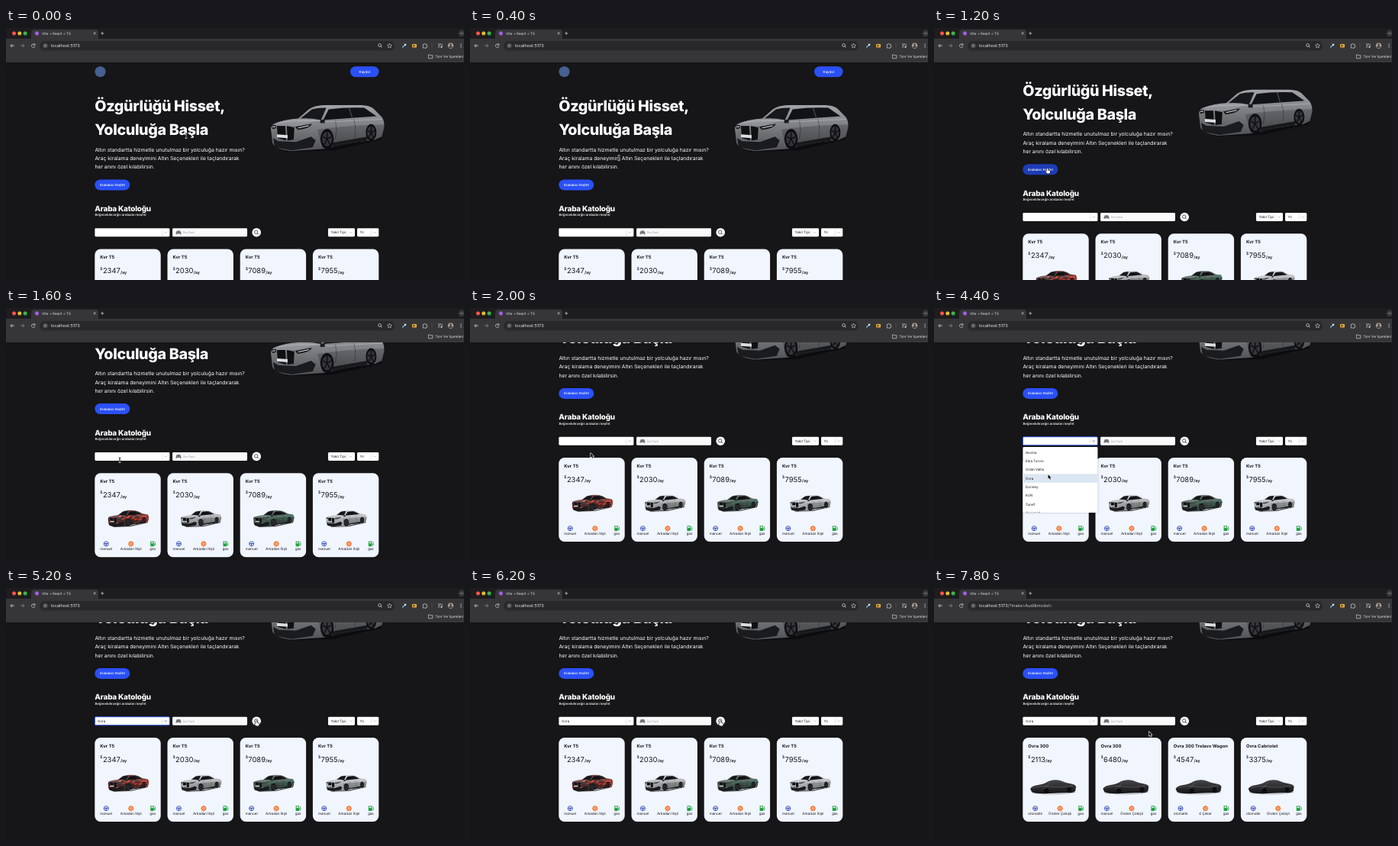
Write an HTML page with a canvas that moves like this. It is 600 px wide and 330 px high and loops after 8000 ms.

```html
<!DOCTYPE html>
<html lang="tr">
<head>
<meta charset="utf-8">
<title>Araba Kataloğu</title>
<style>
html, body { margin: 0; width: 100%; height: 100%; overflow: hidden; background: #161518; }
canvas { display: block; width: 600px; height: 330px; }
</style>
</head>
<body>
<canvas id="stage"></canvas>
<script>
const LOOP = 8000, STEP = 200;
const OPEN = 2600, PICK = 4600, BLUR = 6000, SEARCH = 6400, LOADED = 7000;
const BLUE = '#2a50f6', INK = '#17171c', BAR = '#363638', ICON = '#d5d5d8';

const canvas = document.getElementById('stage');
const c = canvas.getContext('2d');
const ratio = Math.max(1, window.devicePixelRatio || 1);
canvas.width = 600 * ratio;
canvas.height = 330 * ratio;
c.textRendering = 'geometricPrecision';

const MAKES = ['Avoma', 'Elna Torvio', 'Ordel Valtis', 'Ovra', 'Dorvley', 'KVR', 'Tunef', 'Gavirond'];
const START_CARDS = [
  { name: 'Kvr T5', price: 2347, paint: ['#6e4442', '#2c2021'], camo: '#d8483b' },
  { name: 'Kvr T5', price: 2030, paint: ['#cfd0d2', '#808286'] },
  { name: 'Kvr T5', price: 7089, paint: ['#6d7d78', '#2d3b38'], camo: '#46705f' },
  { name: 'Kvr T5', price: 7955, paint: ['#d5d7da', '#8e9196'] }
].map(card => ({ gear: 'manuel', drive: 'Arkadan İtişli', ...card }));
const FOUND_CARDS = [
  { name: 'Ovra 300', price: 2113, gear: 'otomatik', drive: 'Önden Çekişli' },
  { name: 'Ovra 300', price: 6480, gear: 'manuel', drive: 'Önden Çekişli' },
  { name: 'Ovra 300 Trelavo Wagon', price: 4547, gear: 'otomatik', drive: '4 Çeker' },
  { name: 'Ovra Cabriolet', price: 3375, gear: 'otomatik', drive: 'Önden Çekişli' }
];

// time, x, y, pointer shape
const MOUSE = [
  [0, 236, 141, 'beam'], [200, 232, 144, 'beam'], [400, 195, 170, 'beam'],
  [800, 149, 203, 'hand'], [1200, 148.5, 184, 'hand'], [1400, 149, 194, 'arrow'],
  [1600, 149, 199, 'beam'], [2000, 158, 190, 'arrow'], [2400, 200, 172, 'arrow'],
  [2800, 200.5, 171, 'arrow'], [3200, 190, 177, 'arrow'], [3800, 158, 202, 'arrow'],
  [4200, 149.5, 218, 'arrow'], [4600, 149.5, 218, 'arrow'], [4800, 316, 171, 'arrow'],
  [5200, 328, 174, 'hand'], [7000, 328, 174, 'hand'], [7200, 312, 180, 'arrow'],
  [7600, 281.5, 188, 'arrow'], [8000, 281.5, 188, 'arrow']
];

const clamp = v => Math.min(1, Math.max(0, v));
const ease = v => (1 - Math.cos(Math.PI * clamp(v))) / 2;
const scrollAt = t => 93.5 * ease((t - 880) / 1040);

function mouseAt(t) {
  const i = MOUSE.findIndex(k => k[0] > t);
  const [t0, x0, y0, kind] = MOUSE[i - 1], [t1, x1, y1] = MOUSE[i];
  const p = ease((t - t0) / (t1 - t0));
  return { x: x0 + (x1 - x0) * p, y: y0 + (y1 - y0) * p, kind };
}

function font(size, weight = 400) {
  c.font = `${weight} ${size}px Inter, "Open Sans", sans-serif`;
}

// y is the middle of the capital letters
function text(s, x, y, size, color = '#fff', weight = 400, align = 'left') {
  font(size, weight);
  c.textAlign = align;
  c.fillStyle = color;
  c.fillText(s, x, y + size * 0.36);
}

function heading(s, x, y, size) {
  c.letterSpacing = `${-size * 0.018}px`;
  text(s, x, y, size, '#fff', 800);
  c.letterSpacing = '0px';
}

function box(x, y, w, h, r, fill) {
  c.beginPath();
  c.roundRect(x, y, w, h, r);
  c.fillStyle = fill;
  c.fill();
}

function dot(x, y, r, fill) {
  c.beginPath();
  c.arc(x, y, r, 0, 7);
  c.fillStyle = fill;
  c.fill();
}

function ring(x, y, r, color, width = 0.8) {
  c.beginPath();
  c.arc(x, y, r, 0, 7);
  c.strokeStyle = color;
  c.lineWidth = width;
  c.stroke();
}

function fill(d, color) {
  c.fillStyle = color;
  c.fill(new Path2D(d));
}

function line(d, color, width = 0.8) {
  c.strokeStyle = color;
  c.lineWidth = width;
  c.stroke(new Path2D(d));
}

function at(x, y, scale, draw) {
  c.save();
  c.translate(x, y);
  c.scale(scale, scale);
  draw();
  c.restore();
}

function shade(y0, y1, top, bottom) {
  const g = c.createLinearGradient(0, y0, 0, y1);
  g.addColorStop(0, top);
  g.addColorStop(1, bottom);
  return g;
}

function wheel(x, y, rx, ry) {
  const disc = (k, color) => {
    c.beginPath();
    c.ellipse(x, y, rx * k, ry * k, 0, 0, 7);
    c.fillStyle = color;
    c.fill();
  };
  disc(1, '#0d0d0f');
  disc(0.74, '#34353a');
  for (let i = 0; i < 5; i++) {
    const a = i * 1.257 - 1.57;
    line(`M${x} ${y}l${Math.cos(a) * rx * 0.7} ${Math.sin(a) * ry * 0.7}`, '#101012', 1.5);
  }
}

const NOSE = 'M1 32Q1 26 7 24Q20 19 37 18';
const TAIL = 'Q151 22 150 30L147 42L138 46L92 52L72 58L26 61Q6 58 3 50Z';
const WAGON = { body: `${NOSE}L51 6Q58 1 72 .5L120 .5Q131 1 136 5L147 16${TAIL}`, glass: 'M70 20L77 6Q100 3 124 4L140 15Z' };
const SEDAN = { body: `${NOSE}L56 5Q66 1 80 .5L100 1.5Q114 4 127 13L146 16${TAIL}`, glass: 'M71 20L80 6Q93 4 105 5L123 15Z' };

// drawn in a 152 by 61 space, nose to the left
function car(shape, [top, bottom], camo) {
  fill('M6 54L80 57L147 42L146 46L84 60L22 62Z', 'rgba(8,8,10,.7)');
  fill(shape.body, shade(0, 62, top, bottom));
  c.save();
  c.clip(new Path2D(shape.body));
  if (camo) {
    let seed = 7;
    const rand = () => (seed = seed * 16807 % 2147483647) / 2147483647;
    for (let i = 0; i < 36; i++) {
      const x = rand() * 150, y = 15 + rand() * 34;
      fill(`M${x} ${y}l${5 + rand() * 9} -4l5 ${rand() * 8}l-11 4z`, camo);
    }
  }
  fill('M5 25Q20 19 37 18L70 20Q52 22 40 28L8 28Z', 'rgba(255,255,255,.12)');
  fill('M62 33Q100 27 151 26L147 43L92 53L70 60Z', 'rgba(0,0,0,.2)');
  fill('M82 50L128 42L128 48L82 56Z', '#18191b');
  c.restore();
  fill('M40 18L55 6Q63 3.5 74 4L67 20Q52 17 40 18Z', '#17181b');
  fill(shape.glass, '#111215');
  line('M104 4L108 17', '#4a4c50', 1.2);
  line('M10 24Q30 20 66 21M68 23L148 19', 'rgba(255,255,255,.3)', 0.9);
  line('M86 45Q89 32 86 21M111 43Q114 30 110 19', 'rgba(0,0,0,.4)', 0.8);
  fill('M2 27L8 27L8 31L3 32ZM33 29L55 25Q53 31 36 33Z', '#1b1c20');
  line('M3 29L7 29M37 30.5L51 27.5', '#e3e6ea', 1);
  fill('M9 28L20 28L21 47L10 44ZM22 28L32 30L31 46L23 47Z', '#0f1012');
  fill('M4 44L11 48L34 49L54 42L60 47L56 56L28 60L6 56Z', '#1a1b1e');
  fill('M66 20L72 19L72 24L66 24Z', '#1a1b1e');
  fill('M9 39L23 40L23 44L9 43Z', '#dcdddf');
  wheel(75, 45, 8.8, 13);
  wheel(133, 36.5, 7, 11);
}

function coveredCar(x, y) {
  c.save();
  c.translate(x, y);
  fill('M1 15Q25 22 58 15L60 17Q32 22 3 18Z', 'rgba(70,70,75,.3)');
  fill('M0 12Q2 8 10 7Q18 6 24 2Q31 -1 39 1Q46 4 52 5Q59 6 60 9L59 15Q55 18 49 17L25 18Q8 19 2 16Z', shade(0, 18, '#48484c', '#151517'));
  line('M3 11Q16 7 26 9T56 8M17 12Q23 9 25 4', 'rgba(255,255,255,.22)', 0.7);
  dot(21, 14.5, 3.2, '#0c0c0e');
  dot(51, 13, 2.9, '#0c0c0e');
  c.restore();
}

function lens(x, y, r, color) {
  ring(x, y, r, color, 0.8);
  line(`M${x + r * 0.7} ${y + r * 0.7}l${r * 0.8} ${r * 0.8}`, color, 0.9);
}

const chevron = (x, y, color) => line(`M${x - 1.6} ${y - 0.8}l1.6 1.6l1.6 -1.6`, color, 0.7);

function browser(t) {
  c.fillStyle = '#1d1d1f';
  c.fillRect(0, 0, 600, 14);
  c.fillStyle = BAR;
  c.fillRect(0, 14, 600, 31);
  ['#f0544d', '#efb42f', '#36b84a'].forEach((color, i) => dot(10.5 + i * 7.3, 7, 2.5, color));
  box(33, 2, 88, 14, [4, 4, 0, 0], BAR);
  dot(40.5, 7, 2.5, '#a45cf0');
  text('Vite + React + TS', 47, 7, 4.6, '#e6e6e8');
  line('M114.6 5.4l3 3m0 -3l-3 3', ICON, 0.7);
  line('M124 7h4.4m-2.2 -2.2v4.4', ICON, 0.7);
  dot(597, 7, 4.5, BAR);
  chevron(597, 7, ICON);

  line('M11 23.2h-5m2.2 -2.2l-2.2 2.2l2.2 2.2', ICON);
  line('M19 23.2h5m-2.2 -2.2l2.2 2.2l-2.2 2.2', '#88888c');
  line('M37.8 22a2.3 2.3 0 1 0 .2 2M38 20.6v1.8h-1.8', ICON);
  box(44, 17, 465, 12.6, 6.3, '#28282a');
  dot(51.5, 23.2, 3.6, '#3c3c3f');
  ring(51.5, 23.2, 1.6, ICON, 0.6);
  const host = 'localhost:5173';
  text(host, 59, 23.2, 5.6, '#f0f0f2');
  if (t >= SEARCH) {
    const w = c.measureText(host).width;
    text('/?make=Audi&model=', 59 + w, 23.2, 5.6, '#c4c4c8');
  }
  lens(489.6, 22.6, 1.9, ICON);
  line('M502.5 20.2l.9 2 2.1.2-1.6 1.4.5 2.1-1.9-1.1-1.9 1.1.5-2.1-1.6-1.4 2.1-.2z', ICON, 0.6);
  line('M519.2 25.6l3.4 -3.4', '#8fbce8', 1.3);
  line('M522 21l2 2m-1 -1l1 -1', '#eee', 1.3);
  box(532, 21, 6, 4.6, 0.8, '#e9a93c');
  box(533.3, 22.2, 2.3, 2, 0.4, '#50371a');
  line('M546.4 21.5h1.2a1 1 0 1 1 2 0h1.4v1.4a1 1 0 1 1 0 2v1.2h-4.6z', ICON, 0.7);
  line('M558 19.5v7.5', '#58585b', 0.6);
  line('M566 21h4.5m-4.5 2h3m-3 2h2.2M571.2 21.2v3.6', ICON, 0.7);
  dot(570.4, 25, 1, ICON);
  dot(582.5, 23.2, 3.6, '#a9a29c');
  dot(582.5, 22, 1.4, '#4b4442');
  fill('M579.8 25.9a2.7 2.7 0 0 1 5.4 0z', '#4b4442');
  [-2, 0, 2].forEach(d => dot(596, 23.2 + d, 0.6, ICON));

  line('M553.4 35h2l.8.8h2.7v3.9h-5.5z', ICON, 0.7);
  text('Tüm Yer İşaretleri', 562, 37.4, 4.5, '#e6e6e8');
}

function hero(mouse, scroll) {
  dot(123.5, 57.2, 7, '#46618f');
  box(451, 50.2, 37.5, 14, 7, BLUE);
  text('Kaydol', 469.8, 57.2, 4.4, '#fff', 500, 'center');
  heading('Özgürlüğü Hisset,', 116.3, 102.2, 19.7);
  heading('Yolculuğa Başla', 116.3, 132.9, 19.7);
  ['Altın standartta hizmetle unutulmaz bir yolculuğa hazır mısın?',
    'Araç kiralama deneyimini Altın Seçenekleri ile taçlandırarak',
    'her anını özel kılabilirsin.'
  ].forEach((s, i) => text(s, 116.4, 159.2 + i * 11.3, 6.8));
  const y = mouse.y + scroll;
  const hover = mouse.x > 116 && mouse.x < 162 && y > 198 && y < 212.5;
  box(116.3, 198.4, 46, 14, 7, hover ? '#1d3cb6' : BLUE);
  text('Arabaları Keşfet', 139.3, 205.4, 4.35, '#fff', 500, 'center');
  at(346, 100.5, 0.995, () => car(WAGON, ['#a3a5a9', '#4e5054']));
}

function select(x, w, label, focus) {
  box(x, 262.2, w, 11, 1.4, '#fff');
  if (focus) {
    c.strokeStyle = '#2b50e2';
    c.lineWidth = 1;
    c.stroke();
  }
  const edge = x + w;
  line(`M${edge - 10} 264.4v6.6`, '#c6c6cb', 0.5);
  chevron(edge - 5.2, 267.8, focus ? '#444' : '#aaaab0');
  text(label, x + 3.6, 267.7, 4.5, INK);
}

function filters(t) {
  heading('Araba Katoloğu', 116.3, 236.4, 9.9);
  text('Beğenebileceğin arabaları keşfet', 116.4, 244.9, 4.3, '#fff', 500);
  const focus = t >= OPEN && t < BLUR;
  select(116.4, 98, t >= PICK ? MAKES[3] : '', focus);
  const caret = (t - OPEN) % 1000 < 500;
  if (focus && t < PICK && caret) line('M120.2 264.8v6', '#222', 0.5);
  box(218, 262.2, 98, 11, 1.4, '#fafafb');
  fill('M222.6 270.2v-2.2l1.2 -2.6h4.4l1.2 2.6v2.2h-1.3v-.8h-4.2v.8z', '#70747c');
  text('Örn:Tavil', 231.4, 267.7, 3.7, '#90939b');
  dot(328.2, 267.7, 5.8, '#fff');
  lens(327.7, 267.2, 2.2, '#202a5a');
  select(422, 35, 'Yakıt Tipi');
  select(460, 28.3, 'Yıl');
}

function steering(x, y) {
  ring(x, y, 3, '#3349b8', 0.9);
  line(`M${x - 3} ${y - 0.3}h6M${x} ${y}v3`, '#3349b8', 0.9);
  dot(x, y, 1, '#3349b8');
}

function cog(x, y) {
  for (let i = 0; i < 8; i++) {
    const a = i * Math.PI / 4;
    dot(x + Math.cos(a) * 2.9, y + Math.sin(a) * 2.9, 0.9, '#f07a35');
  }
  dot(x, y, 2.9, '#f07a35');
  ring(x, y, 1.3, '#fde3d2', 0.7);
}

function pump(x, y) {
  box(x - 3, y - 3.4, 4.6, 6.8, 0.7, '#22a343');
  box(x - 2, y - 2.4, 2.6, 1.9, 0.2, '#e6f6e9');
  line(`M${x + 1.6} ${y}h.8v2.2h1v-4l-1.3 -1.2`, '#22a343', 0.7);
}

function card(info, x, y) {
  box(x, y, 86.4, 110, 7.5, '#f1f5fe');
  text(info.name, x + 7, y + 10.6, 5.9, INK, 700);
  text('$', x + 7, y + 25.4, 5, INK, 500);
  text(info.price, x + 10.6, y + 28.2, 9.4, INK);
  const end = x + 10.8 + c.measureText(info.price).width;
  text('/ay', end, y + 30.4, 5.4, INK, 600);

  if (info.paint) at(x + 17, y + 48.5, 0.358, () => car(SEDAN, info.paint, info.camo));
  else coveredCar(x + 9.8, y + 55);

  font(4.6);
  const labels = [info.gear, info.drive, 'gas'];
  const [a, b, d] = labels.map(s => c.measureText(s).width);
  const left = x + 7, right = x + 79.8;
  const gap = (right - left - a - b - d) / 2;
  const mids = [left + a / 2, left + a + gap + b / 2, right - d / 2];
  [steering, cog, pump].forEach((icon, i) => {
    icon(mids[i], y + 92.6);
    text(labels[i], mids[i], y + 99.6, 4.6, INK, 400, 'center');
  });
}

function menu(mouse) {
  c.save();
  c.shadowColor = 'rgba(0,0,0,.25)';
  c.shadowBlur = 3 * ratio;
  box(116.4, 182, 98, 86, 1.4, '#fff');
  c.restore();
  c.save();
  c.beginPath();
  c.rect(116.4, 182, 98, 86);
  c.clip();
  const row = mouse.y < 183.3 ? 0 : Math.floor((mouse.y - 183.3) / 11.35);
  MAKES.forEach((make, i) => {
    const y = 183.3 + i * 11.35;
    if (i === row) {
      c.fillStyle = '#dce5f2';
      c.fillRect(116.4, y, 98, 11.35);
    }
    text(make, 120, y + 5.7, 4.5, INK);
  });
  c.restore();
}

function pointer({ x, y, kind }) {
  c.save();
  c.translate(x, y);
  c.lineJoin = 'round';
  if (kind === 'beam') {
    const d = 'M-1.3 -3.3Q0 -3.3 0 -2.4V2.4Q0 3.3 -1.3 3.3M1.3 -3.3Q0 -3.3 0 -2.4V2.4Q0 3.3 1.3 3.3';
    line(d, '#fff', 1.4);
    line(d, '#111', 0.7);
  } else {
    const arrow = kind === 'arrow';
    const d = arrow
      ? 'M0 0V5.8L1.4 4.6L2.4 6.8L3.4 6.4L2.4 4.2H4.2Z'
      : 'M-.7 .1Q0 -.6 .6 .1V2.2L3 2.8Q3.7 3 3.6 4L3 6.6H-.4L-2.3 4Q-2 3 -.7 3.8Z';
    line(d, arrow ? '#fff' : '#111', 1.1);
    fill(d, arrow ? '#0a0a0a' : '#fff');
  }
  c.restore();
}

function draw(t) {
  const scroll = scrollAt(t), mouse = mouseAt(t);
  c.setTransform(ratio, 0, 0, ratio, 0, 0);
  c.fillStyle = '#161518';
  c.fillRect(0, 0, 600, 330);
  c.save();
  c.translate(0, -scroll);
  hero(mouse, scroll);
  filters(t);
  const cards = t < LOADED ? START_CARDS : FOUND_CARDS;
  cards.forEach((info, i) => card(info, 116.3 + i * 95.2, 289.5));
  c.restore();
  if (t >= OPEN && t < PICK) menu(mouse);
  browser(t);
  pointer(mouse);
}

function tick() {
  const t = performance.now() % LOOP;
  draw(Math.floor(t / STEP) * STEP);
  requestAnimationFrame(tick);
}
tick();
</script>
</body>
</html>
```
